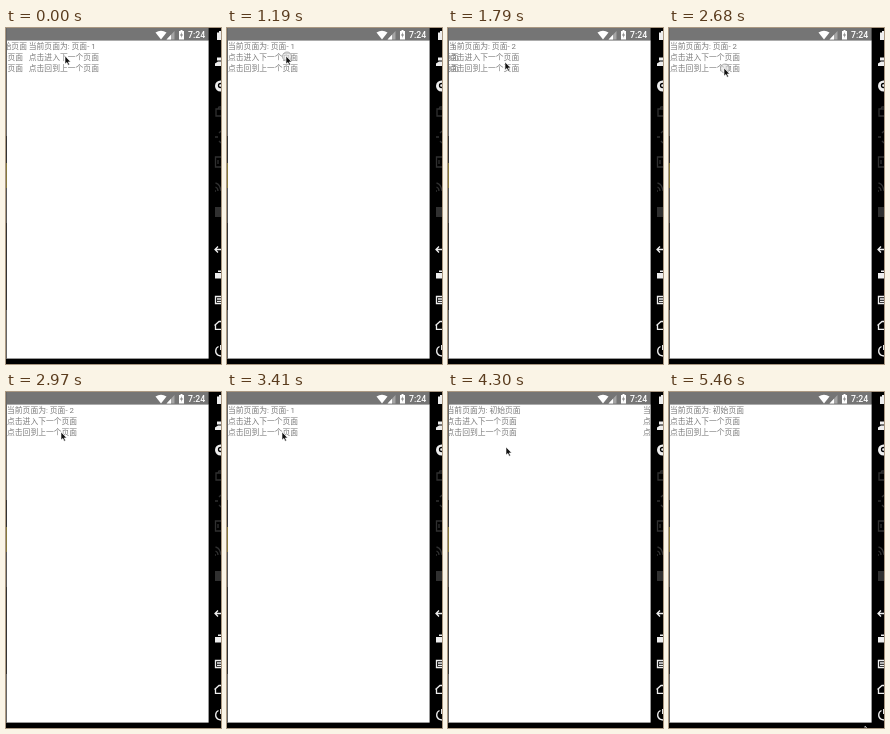
An HTML page for the animation above (5.56 s loop, 215x336 px).

```html
<!DOCTYPE html>
<html lang="zh-CN">
<head>
<meta charset="utf-8">
<style>
  html, body { margin: 0; width: 100%; height: 100%; overflow: hidden; background: #000; }
  svg { display: block; width: 215px; height: 336px; }
  text { font-family: Roboto, "Noto Sans CJK SC", "Noto Sans CJK", sans-serif; white-space: pre; }
  #pages { font-size: 7.8px; fill: #7c7c7c; }
  #tools { fill: none; stroke: #eee; stroke-width: 1.3; }
  #tools .solid { fill: #eee; stroke: none; }
  #tools .dim { stroke: #303030; }
</style>
</head>
<body>
<svg viewBox="0 0 215 336">
  <defs><clipPath id="screen"><rect x="1" y="12.600" width="201.600" height="318"/></clipPath></defs>
  <rect width="215" height="336"/>

  <!-- desktop showing past the window's left edge -->
  <path d="M.5 0V108M.5 282V331" stroke="#666"/>
  <path d="M.5 108V135M.5 195V282" stroke="#333"/>
  <path d="M.5 135V160" stroke="#86793f"/>
  <path d="M.5 160V195" stroke="#555"/>

  <rect x="1" width="201.600" height="13" fill="#757575"/>
  <rect x="1" y="12.600" width="201.600" height="318" fill="#fff"/>

  <!-- status bar -->
  <g fill="#fff">
    <path d="M149.500 4.500Q155 1 160.500 4.500L155 11.500Z"/>
    <path d="M168.500 3V11.500H160.500Z" opacity=".35"/>
    <path d="M165 6.700V11.500H160.500Z"/>
    <path d="M173 3H174.500V2H176.500V3H178V11.500H173Z"/>
    <path d="M176 4L174 7.500H175.500L175 10L177 6.500H175.500Z" fill="#757575"/>
    <text x="182" y="10" font-size="8.700" font-weight="500">7:24</text>
  </g>

  <!-- emulator toolbar, cut off by the right edge -->
  <g id="tools">
    <path class="solid" d="M211 4.500H213V3H215V12H211Z"/>
    <path class="solid" d="M209 38V35.500L212 33.500H215V38ZM211 29.500H215V32.500H211Z"/>
    <circle class="solid" cx="214.500" cy="58" r="5.500"/>
    <circle cx="214.500" cy="57.500" r="2" style="stroke:#000"/>
    <path class="dim" d="M215 81H210V88H215M212 81L213 79H215"/>
    <path class="dim" d="M209 109H212M213 105L215 103M213 113L215 115"/>
    <path class="dim" d="M215 129H209.500V139H215M212 132V136"/>
    <path class="dim" d="M209.500 155Q214 156 215 163M209.500 159Q212 160 212 163M209 163H210"/>
    <path d="M209 179H215V189H209Z" fill="#303030" stroke="none"/>
    <path d="M212 218.500L209 221.500L212 224.500M209 221.500H215"/>
    <path class="solid" d="M209 245H215V250.500H209ZM212 242.500H215V244H212Z"/>
    <path d="M215 268.500H209.500V275.500H215M211 271H215M211 273.300H215"/>
    <path d="M208.500 297.500L213 293.500H215M209.500 297V301.300H215"/>
    <path d="M212.500 318.500A5 5 0 0 0 212.500 327.500L215 328M214.700 317V322"/>
  </g>

  <g clip-path="url(#screen)"><g id="pages"></g></g>
  <circle id="touch" r="4.500" fill="#ddd" fill-opacity=".6" stroke="#999" stroke-width=".8"/>
  <path id="cursor" d="M0 0V8L1.900 6.400L3.200 9.200L4.500 8.600L3.300 5.900H5.700Z" fill="#111" stroke="#fff" stroke-width=".6"/>
</svg>
<script>
const LOOP = 5560, WIDTH = 202, PARALLAX = 0.3 * WIDTH, SLIDE = 460;
const $ = id => document.getElementById(id);

const steps = (from, to, count) =>
  Array.from({ length: count }, (_, i) => Math.ceil((from + i * (to - from) / (count - 1)) / 10) * 10);
const ticks = [0, 150, 300, ...steps(1190, 2230, 8), 2380,
  ...steps(2680, 3410, 6), ...steps(3860, 4880, 8), 5030, 5460];

// Page navigation: [start time, change of stack depth]
const moves = [[-309, 1], [1335, 1], [2860, -1], [3932, -1]];
const touches = [[1190, 1340], [2680, 2830], [3860, 4010]];
const path = [[0, 59, 28], [1490, 59, 28], [1790, 57, 34], [2230, 56, 40], [2380, 55, 40],
  [4010, 55, 40], [4300, 58, 55], [4880, 190, 328], [5030, 196, 334], [LOOP, 196, 334]];

const pages = ['初始页面', '页面- 1', '页面- 2'].map(name => {
  const lines = ['当前页面为: ' + name, '点击进入下一个页面', '点击回到上一个页面'];
  $('pages').insertAdjacentHTML('beforeend', '<g>' + lines.map((line, i) =>
    `<text x="1" y="${21.4 + i * 10.6}">${line}</text>`).join('') + '</g>');
  return $('pages').lastChild;
});

const decelerate = p => 1 - (1 - p) ** 2;
const clamp = p => Math.min(1, Math.max(0, p));

function cursorAt(t) {
  const i = path.findIndex(point => point[0] > t);
  const [t0, x0, y0] = path[i - 1], [t1, x1, y1] = path[i];
  const p = (t - t0) / (t1 - t0);
  return [x0 + (x1 - x0) * p, y0 + (y1 - y0) * p];
}

function draw(t) {
  const depth = moves.reduce((sum, [start, change]) =>
    sum + change * decelerate(clamp((t - start) / SLIDE)), 0);
  pages.forEach((page, i) => {
    const gap = i - depth;
    page.setAttribute('transform', `translate(${gap * (gap > 0 ? WIDTH : PARALLAX)})`);
    page.style.display = Math.abs(gap) < 1 ? '' : 'none';
  });
  const [x, y] = cursorAt(t);
  $('cursor').setAttribute('transform', `translate(${x} ${y})`);
  $('touch').setAttribute('transform', `translate(${x + 1} ${y + 0.5})`);
  $('touch').style.display = touches.some(([on, off]) => t >= on && t < off) ? '' : 'none';
}

const begin = performance.now();
function frame() {
  const t = (performance.now() - begin) % LOOP;
  draw(ticks.filter(tick => tick <= t).pop());
  requestAnimationFrame(frame);
}
frame();
</script>
</body>
</html>
```
